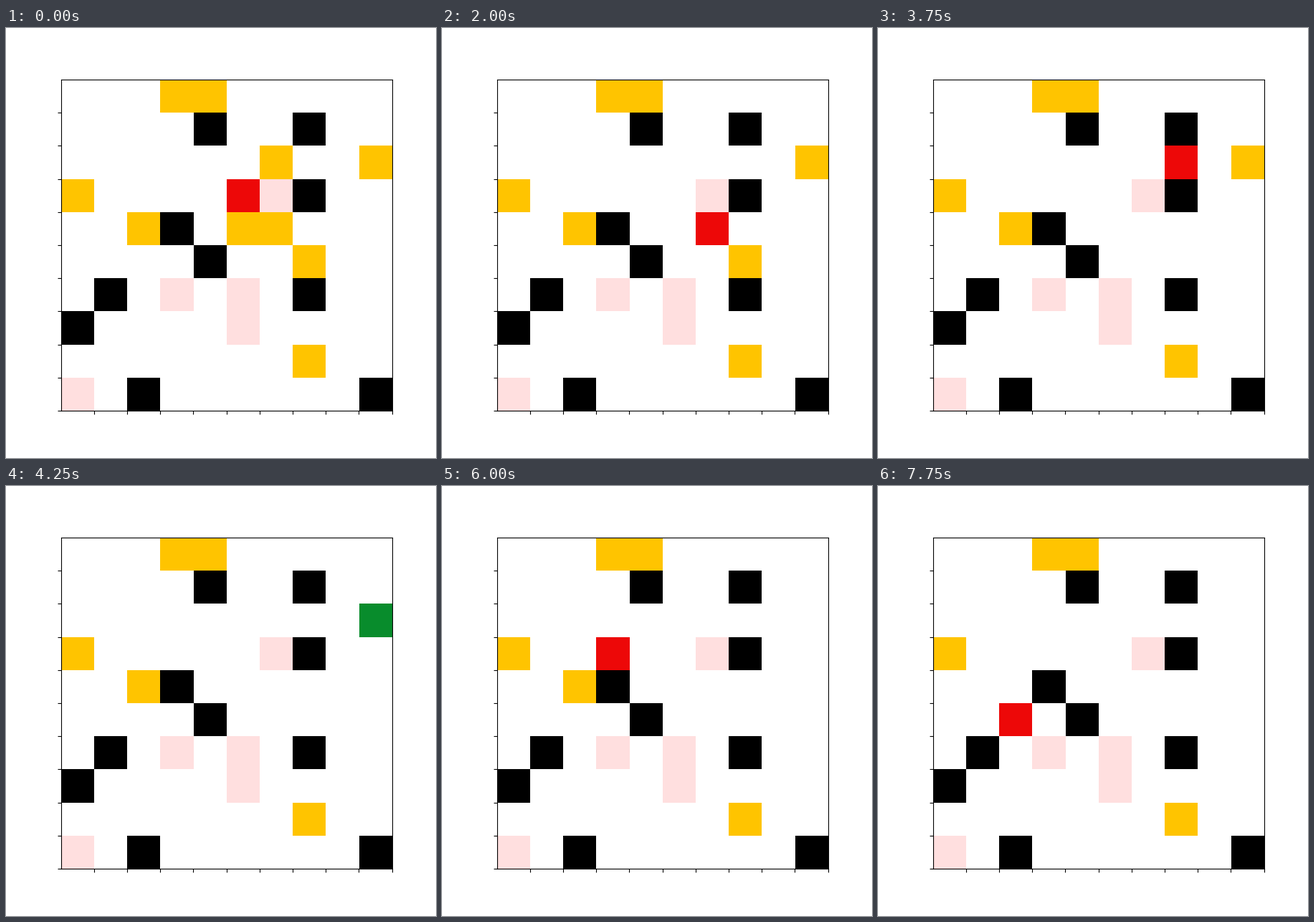
These frames come from a looping animation (600 px wide and 600 px high, 8000 ms). A matplotlib script:

```python
import numpy as np
import matplotlib.pyplot as plt
from matplotlib.animation import FuncAnimation
from matplotlib.colors import ListedColormap

EMPTY, WALL, FOOD, HOME, SEEKER, CARRIER = range(6)
COLORS = ["#ffffff", "#000000", "#ffc400", "#ffdfdf", "#ed0808", "#088c2c"]

# One character per cell: # wall, o food, h drop-off
LAYOUT = [
    "...oo.....",
    "....#..#..",
    "......o..o",
    "o.....h#..",
    "..o#.oo...",
    "....#..o..",
    ".#.h.h.#..",
    "#....h....",
    ".......o..",
    "h.#......#",
]
START = (3, 5)
ROUTE = "DURDUUDDDRULUURRRLLLDLLLLDDDRUL"
STEPS = {"U": (-1, 0), "D": (1, 0), "L": (0, -1), "R": (0, 1)}


def walk():
    """Yield the board after each move: fetch food, drop it on a home cell."""
    board = np.array([[".#oh".index(c) for c in line] for line in LAYOUT])
    row, col = START
    carrying = False
    for move in " " + ROUTE:
        dr, dc = STEPS.get(move, (0, 0))
        row, col = row + dr, col + dc
        if board[row, col] == HOME:
            carrying = False
        elif board[row, col] == FOOD and not carrying:
            carrying = True
            board[row, col] = EMPTY
        view = board.copy()
        view[row, col] = CARRIER if carrying else SEEKER
        yield view


boards = list(walk())

fig, ax = plt.subplots(figsize=(6, 6), dpi=100)
image = ax.imshow(boards[0], cmap=ListedColormap(COLORS), vmin=-0.5, vmax=5.5,
                  interpolation="nearest")
edges = np.arange(0.5, 10)
ax.set_xticks(edges, labels=[""] * 10)
ax.set_yticks(edges, labels=[""] * 10)


def update(i):
    image.set_data(boards[i])
    return [image]


anim = FuncAnimation(fig, update, frames=len(boards), interval=250,
                     repeat=True, repeat_delay=0)
plt.show()
```
